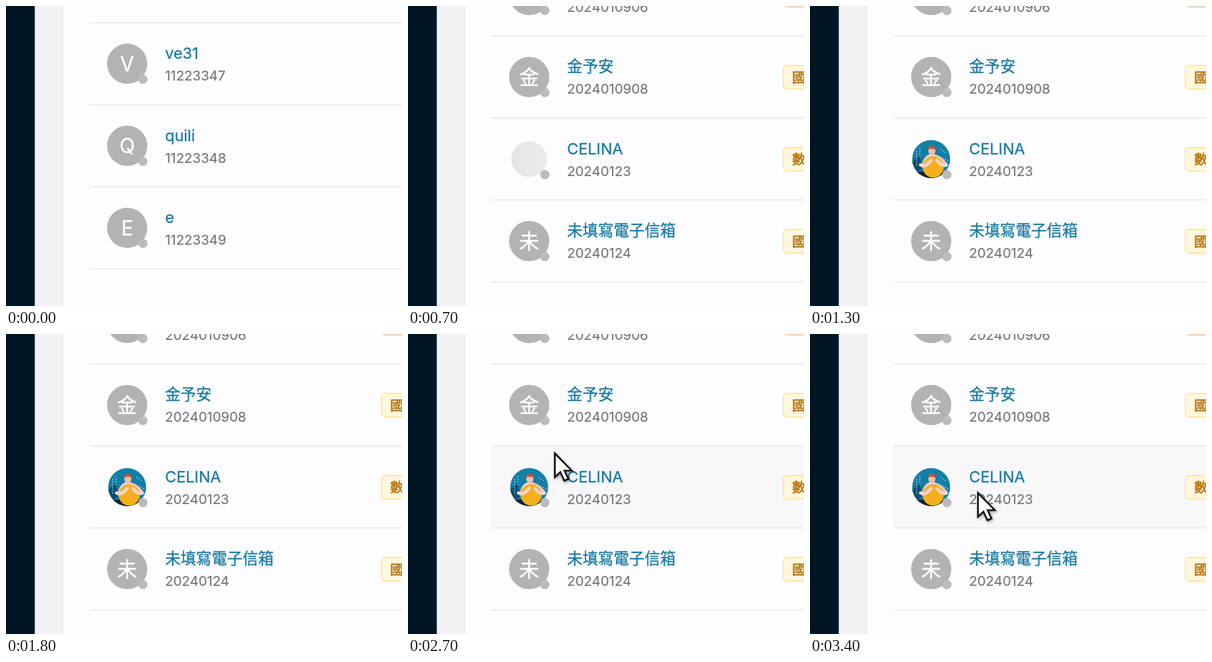
Recreate the animation shown at these times as an HTML page. Size 600 by 455 pixels, loop 3.5 s.

```html
<!DOCTYPE html>
<html lang="zh-Hant">
<head>
<meta charset="utf-8">
<title>Member list</title>
<style>
  html, body { margin: 0; width: 100%; height: 100%; overflow: hidden; background: #fdfcfe; }
  svg { display: block; width: 600px; height: 455px; }
  text { font-family: Inter, "Noto Sans CJK TC", "Noto Sans CJK JP", "Noto Sans CJK", sans-serif; }
  .name { font-size: 23.5px; fill: #177aa2; stroke: #177aa2; stroke-width: .3px; }
  .id { font-size: 20.45px; fill: #757377; stroke: #757377; stroke-width: .15px; }
  .initial { font-size: 30.5px; fill: #fff; stroke: #fff; stroke-width: .4px; text-anchor: middle; }
  .tag { font-size: 20.45px; fill: #b9730c; stroke: #b9730c; stroke-width: .6px; }
  .rule { fill: #e7e6e9; }
</style>
</head>
<body>
<svg viewBox="0 0 600 455">
  <defs>
    <linearGradient id="skeleton">
      <stop offset="0" stop-color="#e5e4e6"/>
      <stop offset="1" stop-color="#ebeaec"/>
    </linearGradient>
    <clipPath id="round"><circle r="28.8"/></clipPath>
    <filter id="shadow" x="-50%" y="-50%" width="200%" height="200%">
      <feDropShadow dx="1" dy="2" stdDeviation="2" flood-opacity=".4"/>
    </filter>
  </defs>
  <rect width="600" height="455" fill="#fdfcfe"/>
  <rect width="86" height="455" fill="#f3f1f4"/>
  <rect x="85" width="1.2" height="455" fill="#e3e2e5"/>
  <rect width="43.6" height="455" fill="#001523"/>
  <rect id="hover" x="126.5" y="170" width="474" height="125" fill="#f8f7fa"/>
  <g id="first"></g>
  <g id="second"></g>
  <path id="cursor" d="M0 0V36L8.3 28.5L14.3 41.5L20.5 38.8L14.7 26.2H25.5Z" fill="#fff" stroke="#111"
        stroke-width="2.6" filter="url(#shadow)"/>
</svg>
<script>
const LOOP = 3500, STEP = 100, SWITCH_AT = 700, LOADED_AT = 1300, CURSOR_AT = 1900;
const PITCH = 124.4;
const $ = id => document.getElementById(id);

// One cursor position per step, entering from the right and then circling the avatar.
const cursorPath = [
  [590, 236], [455, 217], [310, 209], [246, 237], [191.5, 255], [153, 239],
  [140, 209], [170, 183], [222.5, 181], [256, 209], [246, 245], [200, 258],
  [154, 237], [164, 199], [226, 189], [254.5, 241]
];

const tag = (label, y, stroke = '#ffe391', fill = '#fff7dc') => `
  <rect x="568.7" y="${y + 44.8}" width="80" height="35.6" rx="6" fill="${fill}" stroke="${stroke}" stroke-width="1.6"/>
  <text class="tag" x="582" y="${y + 70.5}">${label}</text>`;

const picture = `
  <circle id="placeholder" r="27.2" fill="url(#skeleton)"/>
  <g id="photo" clip-path="url(#round)">
    <circle r="29" fill="#127fa6"/>
    <path d="M-29 4L-17 -6L-14 16L-29 22Z" fill="#0b4f70"/>
    <path d="M-22 -12v22M-17 -17v14M14 -15l9 6M17 -2l9 5" stroke="#cfe6ee" stroke-dasharray="2 2"/>
    <path d="M-29 20Q0 17 29 20V29H-29Z" fill="#12242f"/>
    <path d="M-15 12Q-12 -6 0 -8Q12 -8 24 6L17 14H-8Z" fill="#f5c9c4"/>
    <circle cx="1" cy="-12" r="5.5" fill="#f2bfae"/>
    <path d="M-5 -14Q-4 -21 1 -20Q7 -20 7 -14Q1 -17 -5 -14Z" fill="#c9523c"/>
    <circle cx="3" cy="12" r="16" fill="#f3b01c"/>
    <path d="M-16 9Q-9 13 0 2M23 9Q16 12 9 2" fill="none" stroke="#f8d3cf" stroke-width="5" stroke-linecap="round"/>
  </g>`;

const rule = y => `<rect class="rule" x="126.5" y="${y - .8}" width="474" height="1.6"/>`;

function row(y, name, id, label) {
  const initial = name[0].toUpperCase();
  const avatar = id === '20240123' ? picture : `
    <circle r="30.5" fill="#b3b2b5"/>
    <text class="initial" y="11.2">${initial}</text>`;
  return `${rule(y)}
    <g transform="translate(183.6 ${y + 62.3})">${avatar}
      <circle cx="23.8" cy="23.6" r="7" fill="#bbbabd"/></g>
    <text class="name" x="241" y="${y + 55}">${name}</text>
    <text class="id" x="241" y="${y + 87.8}">${id}</text>
    ${label ? tag(label, y) : ''}`;
}

const list = (top, rows) =>
  rows.map((r, i) => row(top + i * PITCH, ...r)).join('') + rule(top + rows.length * PITCH);

$('first').innerHTML = list(25.3, [
  ['ve31', '11223347'],
  ['quili', '11223348'],
  ['e', '11223349']
]);
$('second').innerHTML = list(45.4 - PITCH, [
  ['金', '2024010906'],
  ['金予安', '2024010908', '國'],
  ['CELINA', '20240123', '數'],
  ['未填寫電子信箱', '20240124', '國']
]) + tag('', 45.4 - PITCH, '#ffc49a', '#fff3e8');

const show = (id, on) => $(id).setAttribute('display', on ? 'inline' : 'none');

function draw(time) {
  const t = Math.floor(time % LOOP / STEP) * STEP;
  const pointing = t >= CURSOR_AT;
  show('first', t < SWITCH_AT);
  show('second', t >= SWITCH_AT);
  show('placeholder', t < LOADED_AT);
  show('photo', t >= LOADED_AT);
  show('hover', pointing);
  show('cursor', pointing);
  if (pointing) {
    const [x, y] = cursorPath[(t - CURSOR_AT) / STEP];
    $('cursor').setAttribute('transform', `translate(${x} ${y})`);
  }
}

const start = performance.now();
function tick() {
  draw(performance.now() - start);
  requestAnimationFrame(tick);
}
tick();
</script>
</body>
</html>
```
